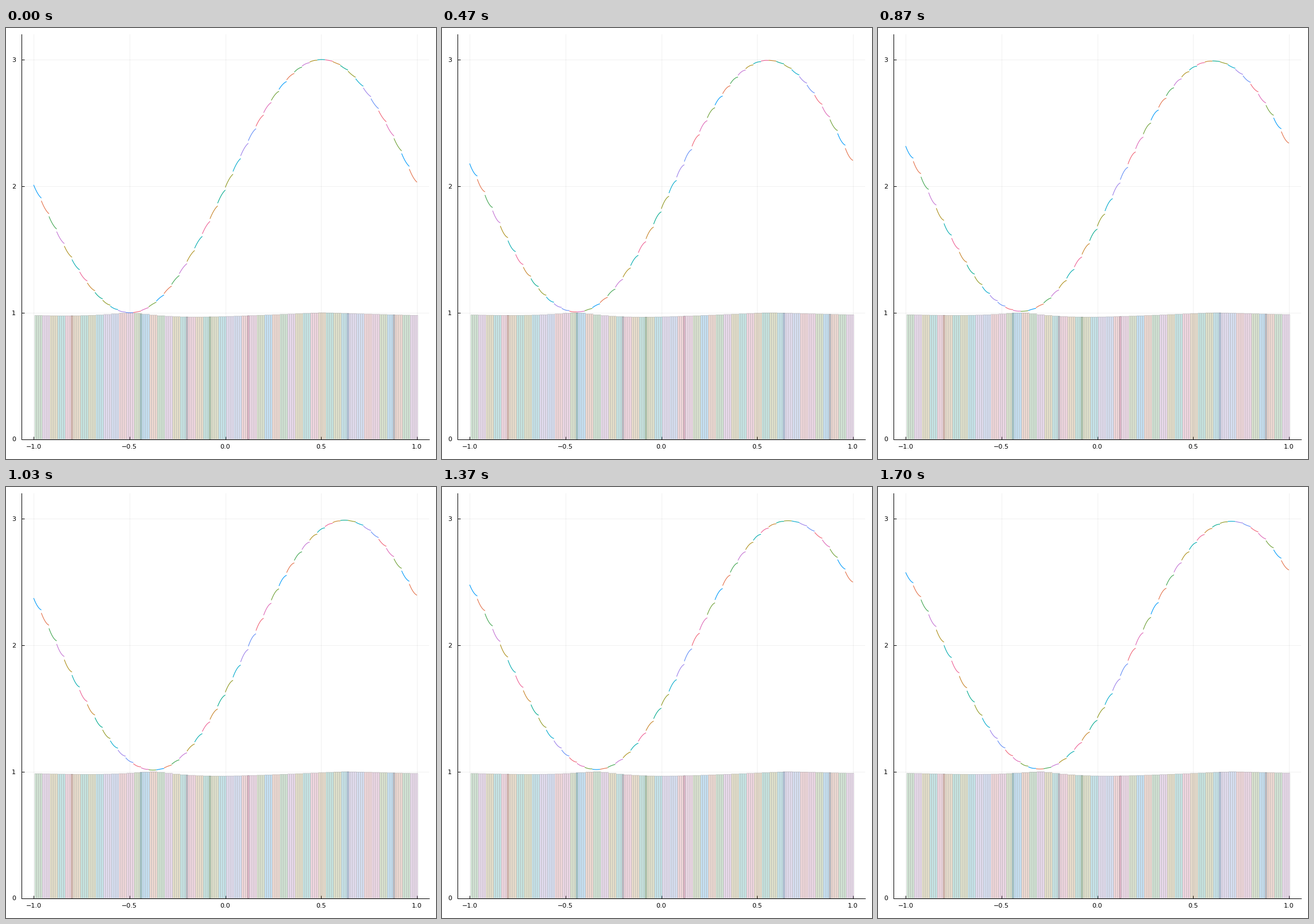
A matplotlib script that plays this animation: 748x749 px, repeating every 1.73 s.

```python
import numpy as np
import matplotlib.pyplot as plt
from matplotlib.animation import FuncAnimation
from matplotlib.collections import LineCollection, PolyCollection
from matplotlib.colors import to_rgba

W, H, DPI = 748, 749, 100
PX = 72 / DPI
STEPS, TRAVEL = 52, 0.2
CELLS = 50
CELL = 2 / CELLS
SUB = CELL / 4
PALETTE = [
    "#009AFA", "#E36F47", "#3EA44E", "#C371D2", "#AC8E18", "#00AAAE",
    "#ED5E93", "#C68225", "#00A98D", "#8E971E", "#00A9CC", "#9B7FE9",
    "#618DF6", "#F06073", "#DD65B6", "#6C9F33",
]
# Cells that also get a bar on their left edge
SHARED = {5, 14, 20, 23, 28, 41, 47}

plt.rcParams["font.family"] = "DejaVu Sans"
fig = plt.figure(figsize=(W / DPI, H / DPI), dpi=DPI, facecolor="white")
left, right, top, bottom = 27.3, 736.2, 11.0, 714.5
x_zero, x_unit = 381.5, 333.4
ax = fig.add_axes([left / W, 1 - bottom / H, (right - left) / W, (bottom - top) / H])
ax.set_xlim((left - x_zero) / x_unit, (right - x_zero) / x_unit)
ax.set_ylim(0, 3.2)
ax.set_xticks([-1, -0.5, 0, 0.5, 1], ["−1.0", "−0.5", "0.0", "0.5", "1.0"])
ax.set_yticks([0, 1, 2, 3])
ax.tick_params(direction="in", length=5 * PX, width=PX, labelsize=8)
ax.tick_params(axis="x", pad=8.2 * PX)
ax.tick_params(axis="y", pad=10 * PX)
ax.grid(color="black", alpha=0.055, linewidth=PX)
ax.set_axisbelow(True)
ax.spines[["top", "right"]].set_visible(False)
for side in ("left", "bottom"):
    ax.spines[side].set_linewidth(PX)

edges = -1 + CELL * np.arange(CELLS)
centers = edges + CELL / 2
xi = np.linspace(-1, 1, 9)
p2 = 1.5 * xi ** 2 - 0.5
xs = edges[:, None] + CELL * (xi + 1) / 2

bars = [(i, edges[i] + SUB * j)
        for i in range(CELLS) for j in range(0 if i in SHARED else 1, 5)]
owner = np.array([i for i, _ in bars])
bar_x = np.array([x for _, x in bars])
corners = np.zeros((len(bars), 4, 2))
corners[:, :, 0] = bar_x[:, None] + 0.4 * SUB * np.array([-1, -1, 1, 1])

columns = PolyCollection(
    corners, linewidths=0.8 * PX, edgecolors=(0, 0, 0, 0.2), snap=False,
    facecolors=[to_rgba(PALETTE[(i + CELLS) % 16], 0.2) for i in owner], zorder=2)
curves = LineCollection(
    np.stack([xs, xs], axis=-1), linewidths=1.1 * PX,
    colors=[PALETTE[i % 16] for i in range(CELLS)], zorder=3)
ax.add_collection(columns, autolim=False)
ax.add_collection(curves, autolim=False)


def solution(step):
    """Cell means and cell-wise parabolas of the travelling, damped wave."""
    amp = 1 - 0.00042 * step
    phase = np.pi * (centers - TRAVEL * (step + 1) / STEPS)
    mean = 2 + amp * np.sin(phase)
    slope = amp * np.pi * CELL * np.cos(phase)
    bend = -amp * (np.pi * CELL) ** 2 * np.sin(phase) / 12
    fade = np.exp(-step / 2)
    tilt = 0.4 + 0.015 * fade
    skew = -0.096 + 0.03 * fade
    u = mean[:, None] + slope[:, None] * (tilt * xi + skew * p2) + bend[:, None] * p2
    return mean, u


def draw(n):
    # Steps last 30, 30 and 40 ms in turn
    step = 3 * (n // 10) + min(n % 10 // 3, 2)
    mean, u = solution(step)
    curves.set_segments(np.stack([xs, u], axis=-1))
    corners[:, 1:3, 1] = (u.min(axis=1) / mean)[owner, None]
    columns.set_verts(corners)
    return columns, curves


anim = FuncAnimation(fig, draw, frames=173, interval=10, repeat=True,
                     repeat_delay=0, blit=False)
plt.show()
```
